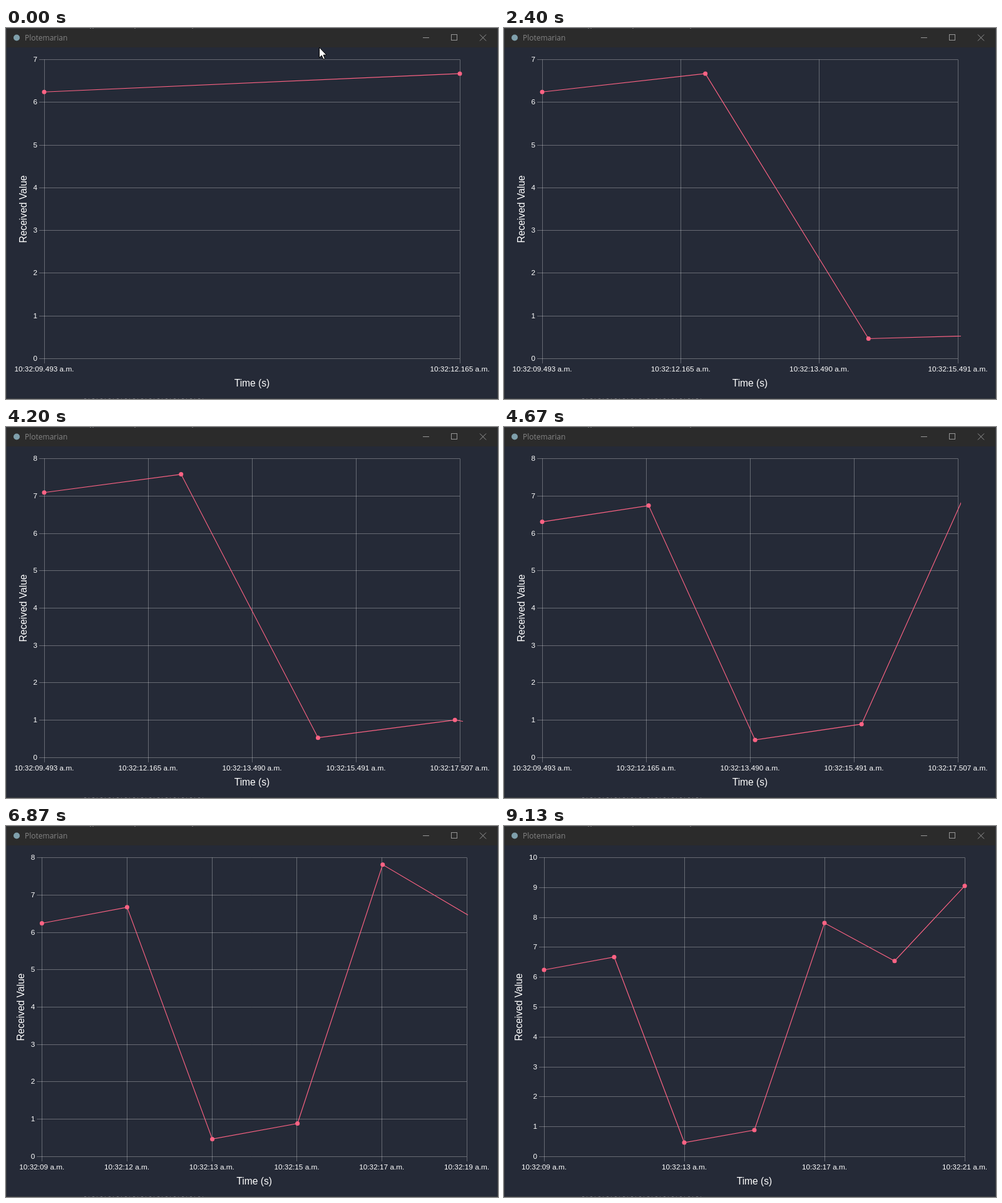
Animation of 786x593 px, one loop 9390 ms. Source, as an HTML page with a canvas:

```html
<!DOCTYPE html>
<html lang="en">
<head>
<meta charset="utf-8">
<title>Live chart</title>
<style>
  html, body { margin: 0; width: 100%; height: 100%; overflow: hidden; background: #252a37; }
  canvas { display: block; }
</style>
</head>
<body>
<canvas id="stage" width="786" height="593"></canvas>
<script>
const ctx = document.getElementById('stage').getContext('2d');
const LOOP = 9390, TICK = 1000 / 15, DURATION = 1000;
const TOP = 50.4, BOTTOM = 528.15, OVERFLOW = 5;
const PINK = '#ff6384', GRID = 'rgba(255,255,255,0.3)';
const SANS = '"Liberation Sans", Arial, sans-serif';

const values = [6.24, 6.67, 0.464, 0.882, 7.81, 6.54, 9.05];
const seconds = ['09.493', '12.165', '13.490', '15.491', '17.507', '19', '21'];

// Each stage adds one reading to the chart.
const stages = [
  { start: -DURATION, left: 61, right: 725, max: 7, titleX: 33 },
  { start: 171, left: 61, right: 725, max: 7, titleX: 33 },
  { start: 2172, left: 61, right: 725, max: 7, titleX: 33 },
  { start: 4188, left: 61, right: 725, max: 8, titleX: 33 },
  { start: 6199, left: 57.3, right: 736, max: 8, titleX: 29, short: true },
  { start: 8190, left: 64, right: 736, max: 10, titleX: 29, short: true, every: 2 }
];
stages.forEach((s, i) => { s.count = i + 2; });

const crisp = v => Math.floor(v + 0.25) + 0.5;
const easeOutQuart = p => 1 - Math.pow(1 - p, 4);
const mix = (a, b, p) => a + (b - a) * p;
const xAt = (s, i) => s.left + (s.right - s.left) * i / (s.count - 1);
const yAt = (s, v) => BOTTOM - (BOTTOM - TOP) * v / s.max;

function path(points, close) {
  ctx.beginPath();
  points.forEach(([x, y]) => ctx.lineTo(x, y));
  if (close) ctx.closePath();
}

function line(x1, y1, x2, y2, color) {
  path([[x1, y1], [x2, y2]]);
  ctx.strokeStyle = color;
  ctx.stroke();
}

function text(str, x, y, font, align, color = '#fff') {
  ctx.font = font;
  ctx.textAlign = align;
  ctx.fillStyle = color;
  ctx.fillText(str, x, y);
}

function drawWindow() {
  ctx.fillStyle = '#252a37';
  ctx.fillRect(0, 0, 786, 593);
  ctx.fillStyle = '#2b2b2b';
  ctx.fillRect(0, 0, 786, 31);
  ctx.lineWidth = 1;
  ctx.strokeStyle = '#3c3d41';
  ctx.strokeRect(0.5, 0.5, 785, 592);

  // Slivers of text from the windows behind.
  ctx.setLineDash([3, 4, 1, 5]);
  line(125, 592.5, 318, 592.5, '#77787c');
  ctx.setLineDash([]);
  for (const x of [134, 138, 205, 297]) line(x, 0.5, x + 2, 0.5, '#77787c');

  ctx.fillStyle = '#7f9fab';
  ctx.beginPath();
  ctx.arc(17, 15.5, 5, 0, 7);
  ctx.fill();
  text('Plotemarian', 30, 20, '12px "Open Sans", "Noto Sans", sans-serif', 'left', '#858585');

  const gray = '#969696';
  line(666, 15.5, 676, 15.5, gray);
  ctx.strokeRect(711.5, 10.5, 9, 9);
  line(757, 10.5, 767, 20.5, gray);
  line(767, 10.5, 757, 20.5, gray);
}

function drawAxes(s) {
  const small = '11.8px ' + SANS, large = '15.6px ' + SANS;
  for (let v = 0; v <= s.max; v++) {
    const y = crisp(yAt(s, v));
    line(s.left - 8, y, s.right, y, GRID);
    text(v, s.left - 11, y + 3.5, small, 'right');
  }
  for (let i = 0; i < s.count; i += s.every || 1) {
    const x = xAt(s, i), gx = crisp(x);
    line(gx, TOP, gx, BOTTOM + 8, GRID);
    const sec = s.short ? seconds[i].slice(0, 2) : seconds[i];
    text(`10:32:${sec} a.m.`, x, 549, small, 'center');
  }
  text('Time (s)', (s.left + s.right) / 2, 573, large, 'center');
  ctx.save();
  ctx.translate(s.titleX - 0.5, 289.5);
  ctx.rotate(-Math.PI / 2);
  text('Received Value', 0, 0, large, 'center');
  ctx.restore();
}

function drawSeries(s, prev, p) {
  const points = values.slice(0, s.count).map((v, i) => {
    const fromY = i < prev.count ? yAt(prev, v) : BOTTOM;
    return [mix(xAt(prev, i), xAt(s, i), p), mix(fromY, yAt(s, v), p)];
  });
  ctx.save();
  ctx.beginPath();
  ctx.rect(s.left - OVERFLOW, TOP - OVERFLOW,
    s.right - s.left + 2 * OVERFLOW, BOTTOM - TOP + 2 * OVERFLOW);
  ctx.clip();
  path(points);
  ctx.strokeStyle = ctx.fillStyle = PINK;
  ctx.lineWidth = 1.15;
  ctx.stroke();
  for (const [x, y] of points) {
    if (x < s.left - 0.5 || x > s.right + 0.5) continue;
    ctx.beginPath();
    ctx.arc(x, y, 3.5, 0, 7);
    ctx.fill();
  }
  ctx.restore();
}

function drawCursor() {
  path([[500.5, 31], [500.5, 47.5], [504.3, 44], [507, 50],
    [509.5, 49], [507, 43.2], [512, 43]], true);
  ctx.fillStyle = '#fff';
  ctx.fill();
  ctx.strokeStyle = '#000';
  ctx.stroke();
}

function draw(now) {
  const t = Math.floor((now % LOOP + 5) / TICK) * TICK;
  let k = stages.length - 1;
  while (stages[k].start > t) k--;
  const s = stages[k], prev = stages[Math.max(0, k - 1)];
  const p = easeOutQuart(Math.min(1, (t - s.start) / DURATION));
  drawWindow();
  drawAxes(s);
  drawSeries(s, prev, p);
  if (t < 60) drawCursor();
}

const origin = performance.now();
function frame() {
  draw(performance.now() - origin);
  requestAnimationFrame(frame);
}
frame();
</script>
</body>
</html>
```
